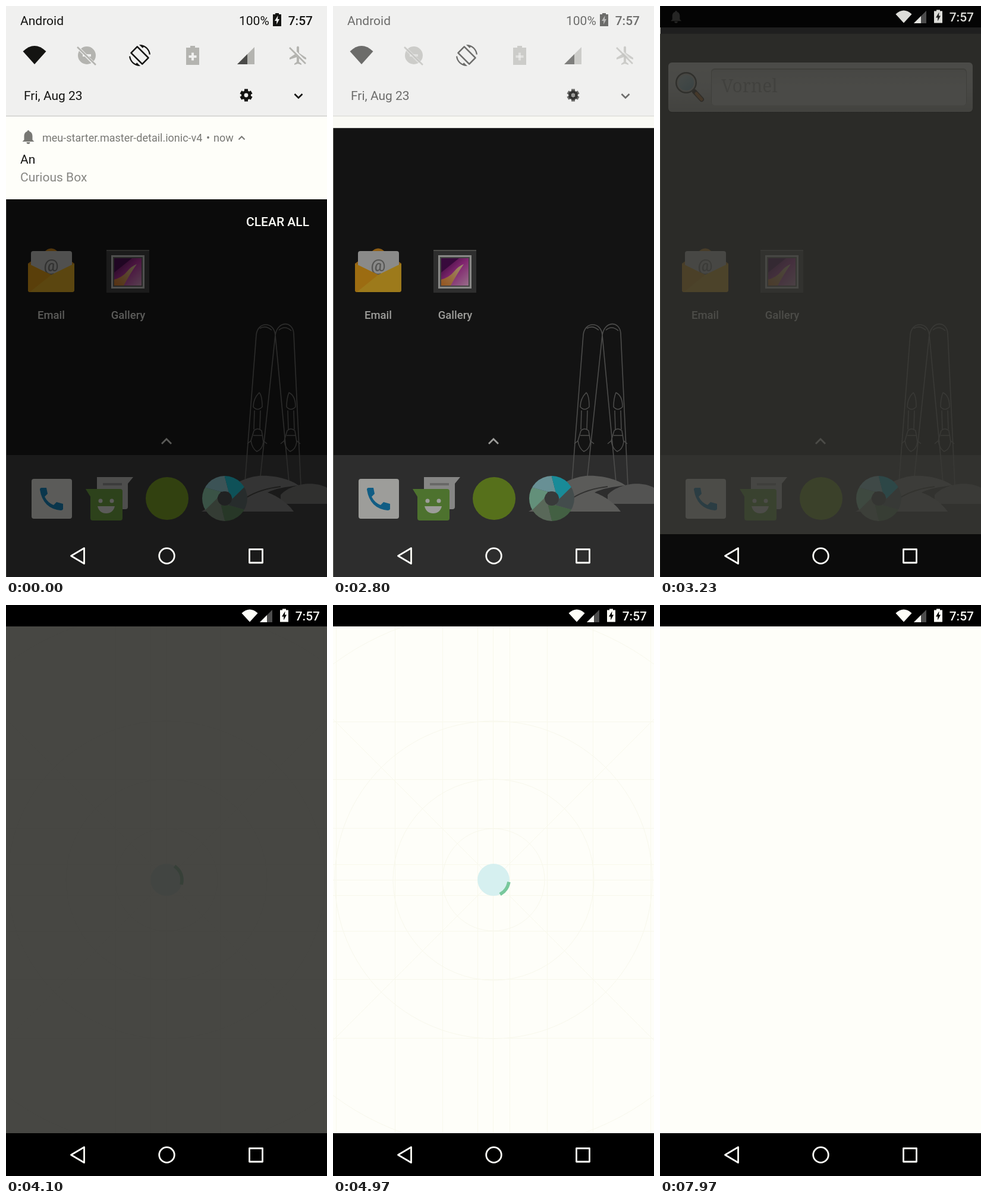
Animation, 540 px wide and 960 px high, one loop 8000 ms. Source, as an HTML page with a canvas:

```html
<!DOCTYPE html>
<html lang="en">
<head>
<meta charset="utf-8">
<title>Notification to splash</title>
<style>
html, body { margin: 0; width: 100%; height: 100%; overflow: hidden; background: #000; }
canvas { display: block; width: 540px; height: 960px; }
</style>
</head>
<body>
<canvas id="stage" width="540" height="960"></canvas>
<script>
const g = document.getElementById('stage').getContext('2d');
const LOOP = 8000;
const HEADER = '#f0f0ef', PAPER = '#fefef9', INK = '#141412', MUTED = '#b4b4b0', GREY = '#787874';
const WHITE = '#fdfdf8', WINDOW = '#2e2e2b';

const clamp = v => Math.max(0, Math.min(1, v));
const span = (t, a, b) => clamp((t - a) / (b - a));
const mix = (a, b, k) => a + (b - a) * k;
const easeOut = k => 1 - (1 - k) ** 3;
const easeInOut = k => k * k * (3 - 2 * k);

function box(x, y, w, h, col) { g.fillStyle = col; g.fillRect(x, y, w, h); }
function round(x, y, w, h, r, col) {
  g.fillStyle = col; g.beginPath(); g.roundRect(x, y, w, h, r); g.fill();
}
function disc(x, y, r, col) {
  g.fillStyle = col; g.beginPath(); g.arc(x, y, r, 0, 7); g.fill();
}
function ring(x, y, r, w, col) {
  g.strokeStyle = col; g.lineWidth = w; g.beginPath(); g.arc(x, y, r, 0, 7); g.stroke();
}
function fill(d, col) { g.fillStyle = col; g.fill(new Path2D(d)); }
function line(d, w, col) { g.strokeStyle = col; g.lineWidth = w; g.stroke(new Path2D(d)); }
function text(s, x, y, size, col, weight = 400, align = 'left', family = 'Roboto, sans-serif') {
  g.font = `${weight} ${size}px ${family}`;
  g.textAlign = align;
  g.fillStyle = col;
  g.fillText(s, x, y);
}
function at(x, y, draw) { g.save(); g.translate(x, y); draw(); g.restore(); }
function faded(a, draw) { g.save(); g.globalAlpha *= a; draw(); g.restore(); }
function gradient(x0, y0, x1, y1, ...cols) {
  const gr = g.createLinearGradient(x0, y0, x1, y1);
  cols.forEach((c, i) => gr.addColorStop(i / (cols.length - 1), c));
  return gr;
}

// Small system icons
function wifi(cx, y, w, h, col) {
  const e = y + h * .3;
  fill(`M${cx} ${y + h}L${cx - w / 2} ${e}Q${cx} ${y - h * .3} ${cx + w / 2} ${e}Z`, col);
}
function signal(x, y, s, cut, on, off) {
  fill(`M${x} ${y + s}L${x + s} ${y}V${y + s}Z`, off);
  fill(`M${x} ${y + s}L${x + cut} ${y + s - cut}V${y + s}Z`, on);
}
function battery(x, y, col, bolt) {
  at(x, y, () => {
    fill('M4 0H10V2H14V22H0V2H4Z', col);
    fill('M8.5 4L3 13H6.2V19L11 10H8Z', bolt);
  });
}
function bell(cx, cy, s, col) {
  at(cx, cy, () => {
    g.scale(s, s);
    fill('M-2-9A2 2 0 0 1 2-9C6-8 7-4 7-1V5L10 8H-10L-7 5V-1C-7-4-6-8-2-9ZM-3 9H3A3 3 0 0 1-3 9Z', col);
  });
}
function statusIcons(back) {
  wifi(410, 7.5, 27, 21, WHITE);
  signal(427, 8, 21, 12, WHITE, 'rgba(255,255,255,.3)');
  battery(461, 6.5, WHITE, back);
  text('7:57', 528, 26, 21, WHITE, 500, 'right');
}
function navButtons() {
  g.lineJoin = 'round';
  line('M109.5 924.5L131.5 911.5V937.5Z', 2.8, WHITE);
  ring(270.5, 924.5, 12.8, 2.8, WHITE);
  line('M409.5 913.5H431.5V936H409.5Z', 2.8, WHITE);
}

// Home screen
function skis() {
  const c = '#7c7c7a';
  g.lineJoin = 'round';
  line('M402 800L421 553C423 530 451 530 453 553L427 800M427 542Q437 536 447 545M453 553L476 800', 1.6, c);
  line('M453 553C457 529 482 529 484 550L496 806M459 545Q469 536 480 546', 1.6, c);
  for (const [x, lean] of [[423, -1], [479, 1]]) {
    at(x, 0, () => line(`M${-lean * 3} 650Q-7 660-7 674Q0 682 8 674Q8 655 ${-lean * 3} 650Z
      M-5 680L${-5 + lean} 712M5 680L${5 + lean} 712M-6 714Q0 708 7 714L10 733Q8 746-1 749Q-9 744-11 731Z
      M-7 722H8M-11 731L-17 736M10 731L16 736`, 1.5, c));
  }
  fill('M462 822C476 806 514 796 540 810V837H462Z', '#868684');
  fill('M329 850C350 840 372 796 425 790C455 788 482 798 492 806C472 808 450 812 440 818C458 824 476 838 484 850Z', '#929290');
  line('M405 826Q428 812 462 808', 2, '#50504e');
}
function searchBar() {
  round(14, 97, 512, 83, 6, '#0c0c0b');
  round(14, 95, 512, 83, 6, gradient(0, 95, 0, 178, '#fbfbfa', '#ececea', '#bebebb'));
  round(86, 105, 430, 62, 6, '#a4a4a1');
  round(87, 107, 428, 60, 5, gradient(0, 107, 0, 167, '#dededc', '#f3f3f2', '#f3f3f2'));
  g.lineCap = 'round';
  line('M58 144L70 157', 8, '#3a2a20');
  line('M61 147L70 157', 5, '#d0752c');
  g.lineCap = 'butt';
  disc(44, 129, 18, '#3c3c3a');
  disc(44, 129, 15.5, '#deded8');
  disc(44, 129, 13, gradient(34, 118, 54, 142, '#d8f2f6', '#84c4dc'));
  text('Vornel', 103, 145, 30, '#b4b4b2', 400, 'left', '"Noto Serif", serif');
}
function emailIcon() {
  fill('M37 433L70 409Q76 406 82 409L115 433V477Q115 481 111 481H41Q37 481 37 477Z', '#e69820');
  round(42, 412, 69, 56, 4, '#dededc');
  text('@', 76, 446, 28, '#8a8a88', 500, 'center');
  fill('M37 433L76 452L115 433V477Q115 481 111 481H41Q37 481 37 477Z', '#fdc42c');
  fill('M37 433L76 452L40 481Q37 481 37 477Z', '#fbae1c');
}
function galleryIcon() {
  box(169, 410, 72, 72, '#4a4a4a');
  box(169, 410, 72, 2, '#787874');
  box(177, 419, 56, 56, '#dcdcda');
  box(180, 422, 50, 50, '#6c6c6a');
  box(182, 424, 46, 46, gradient(182, 424, 228, 470, '#4a0c50', '#d03cb4', '#f4b0dc'));
  fill('M182 470V460Q196 456 204 446Q210 438 220 434Q210 448 198 470Z', gradient(182, 470, 220, 434, '#f08830', '#fce4b8'));
  fill('M182 424H212L182 448Z', '#5a1060');
}
function phoneIcon() {
  round(43, 795, 68, 67, 4, WHITE);
  fill('M60 810H68L70 820L65 825Q70 835 80 839L85 834L96 837V846Q95 848 92 848Q62 845 57 813Q57 810 60 810Z', '#1c96d4');
}
function messageIcon() {
  fill('M153 792H214L205 803V842Q205 846 201 846H157Q153 846 153 842Z', '#d8d8d6');
  box(163, 802, 32, 4, '#a8a8a6');
  fill('M134 812H192Q196 812 196 816V861Q196 865 192 865H146Q142 865 142 861V825Z', '#7cb84a');
  disc(159, 832, 3.5, WHITE);
  disc(178, 832, 3.5, WHITE);
  fill('M154 841H183Q180 853 168.5 853Q157 853 154 841Z', WHITE);
}
function cameraIcon() {
  const cols = ['#6c7a7a', '#6c9a6c', '#90a890', '#a0e8c4', '#a8e8f0', '#28e0f4'];
  g.save();
  g.beginPath(); g.arc(368, 828, 38, 0, 7); g.clip();
  cols.forEach((c, i) => {
    const a = i * Math.PI / 3;
    const p = (r, b) => `${368 + r * Math.cos(b)} ${828 + r * Math.sin(b)}`;
    fill(`M${p(13, a)}L${p(52, a - .6)}L${p(60, a - .08)}L${p(52, a + .45)}L${p(13, a + 1.06)}Z`, c);
  });
  disc(368, 828, 12, '#5a5e5e');
  g.restore();
}
function home() {
  box(0, 0, 540, 960, '#1f1f1f');
  box(0, 755, 540, 205, '#494949');
  box(0, 0, 1, 960, '#a8a8a0');
  skis();
  searchBar();
  emailIcon();
  galleryIcon();
  text('Email', 76, 526, 18.5, WHITE, 500, 'center');
  text('Gallery', 205.5, 526, 18.5, WHITE, 500, 'center');
  g.lineJoin = 'miter';
  line('M262 736L270 728L278 736', 2.8, WHITE);
  phoneIcon();
  messageIcon();
  disc(271, 828, 36, '#8ab42c');
  cameraIcon();
}

// Notification shade
function rotateIcon(x, y) {
  at(x, y, () => {
    g.scale(1.5, 1.5);
    g.lineJoin = 'round';
    line('M-2.8-9.7L-9.7-2.8L2.8 9.7L9.7 2.8Z', 1.7, INK);
    const arrow = 'M4.5-9.5C7.8-7.9 10.1-4.8 10.5-1H12C11.4-7.2 6.3-12 0-12L-.7-12L3.2-8.2Z';
    fill(arrow, INK);
    g.rotate(Math.PI);
    fill(arrow, INK);
  });
}
function quickTiles() {
  wifi(48, 67, 39, 31, INK);

  disc(136, 83, 15, MUTED);
  box(129, 81, 14, 4, HEADER);
  line('M121 70L150 99', 5, HEADER);
  line('M120 69L151 99', 2.6, MUTED);

  rotateIcon(225, 83);

  fill('M310 67H318V70H325V99H303V70H310Z', MUTED);
  box(307.5, 83, 13, 4, HEADER);
  box(312, 78.5, 4, 13, HEADER);

  signal(389, 69, 29, 17, '#4a4a48', MUTED);

  fill('M489 69Q491 66 493 69V79L505 87V90L493 86V94L497 97V99L491 97L485 99V97L489 94V86L477 90V87L489 79Z', MUTED);
  line('M478 69L505 96', 5, HEADER);
  line('M477 70L504 97', 2.6, MUTED);
}
function gear(x, y) {
  at(x, y, () => {
    for (let i = 0; i < 3; i++) { box(-3, -10.5, 6, 21, INK); g.rotate(Math.PI / 3); }
    ring(0, 0, 5.7, 4.6, INK);
    disc(0, 0, 3.4, HEADER);
  });
}
function header() {
  text('Android', 24, 32, 21, INK);
  text('100%', 392, 32, 21, INK);
  battery(449, 12, INK, HEADER);
  text('7:57', 516, 32, 21, INK, 500, 'right');
  quickTiles();
  text('Fri, Aug 23', 30, 158, 21, INK);
  gear(404, 150);
  g.lineJoin = 'miter';
  line('M485.5 148L492 154.5L498.5 148', 2.6, INK);
}
function notification(pressed) {
  box(0, 185, 540, 140, pressed ? '#f9f9f4' : PAPER);
  bell(37.5, 220, 1, GREY);
  text('meu-starter.master-detail.ionic-v4', 61, 228, 18, GREY);
  text('•', 340, 228, 18, GREY, 400, 'center');
  text('now', 349, 228, 18, GREY);
  g.lineJoin = 'miter';
  line('M391.5 224.5L396.5 219.5L401.5 224.5', 2, GREY);
  text('An', 24, 265, 21, INK);
  text('Curious Box', 24, 295, 21, '#868682');
}
function shade(t) {
  const k = easeInOut(span(t, 2670, 2970));
  const h = mix(325, 30, k) - 30 * span(t, 2970, 3050);
  faded(.64 * (1 - k), () => box(0, 0, 540, 960, '#000'));
  faded(1 - span(t, 2670, 2770), () => text('CLEAR ALL', 510, 370, 21, WHITE, 500, 'right'));
  if (h > 0) {
    g.save();
    g.beginPath(); g.rect(0, 0, 540, h); g.clip();
    at(0, h - 325, () => notification(t >= 2370));
    const top = Math.min(185, h);
    box(0, 0, 540, top, HEADER);
    faded(1 - k, () => {
      at(0, top - 185, header);
      box(0, top - 1, 540, 2, '#d8d8d6');
    });
    g.restore();
  }
  const open = h > 15;
  faded(span(t, 2870, 2970), () => {
    bell(27, 18, .9, open ? '#a4a4a2' : WHITE);
    statusIcons(open ? HEADER : '#1f1f1f');
  });
}

// App window and splash
function bezier(x1, x2, x) {
  let lo = 0, hi = 1;
  for (let i = 0; i < 20; i++) {
    const s = (lo + hi) / 2, r = 1 - s;
    if (3 * x1 * s * r * r + 3 * x2 * s * s * r + s ** 3 < x) lo = s; else hi = s;
  }
  return easeInOut(lo);
}
function spinner(t) {
  const e = Math.max(0, t - 3935), p = e % 1333 / 1333;
  const turn = -90 + e * 720 / 4444 + 90 * p;
  const head = turn + 270 * bezier(.4, .2, clamp(p * 2));
  const tail = turn + 270 * bezier(.4, .2, clamp(p * 2 - 1));
  const rad = Math.PI / 180;
  g.strokeStyle = '#78c89c';
  g.lineWidth = 5.6;
  g.lineCap = 'square';
  g.beginPath();
  g.arc(269, 462, 27, tail * rad, Math.max(head, tail + .5) * rad);
  g.stroke();
  g.lineCap = 'butt';
}
function guides() {
  const c = '#f8f8ec';
  for (const x of [5, 104, 184, 243, 269, 297, 360, 437, 534]) box(x, 36, 1, 852, c);
  for (const y of [196, 293, 375, 436, 462, 488, 548, 629, 728]) box(0, y, 540, 1, c);
  for (const r of [86, 169, 267, 452]) ring(270, 462, r, 1, c);
  line('M0 192L540 732M0 732L540 192', 1, c);
}
function splash(t) {
  g.save();
  g.beginPath(); g.rect(0, 36, 540, 852); g.clip();
  box(0, 36, 540, 852, PAPER);
  guides();
  disc(270, 462, 27, '#d6f0f0');
  spinner(t);
  faded(1 - span(t, 4056, 4424), () => box(0, 36, 540, 852, WINDOW));
  faded(span(t, 5735, 6230), () => box(0, 36, 540, 852, PAPER));
  g.restore();
}
function app(t) {
  box(0, 0, 540, 960, '#000');
  box(0, 36, 540, 852, WINDOW);
  if (t >= 4100) splash(t);
  statusIcons('#000');
}

function draw(t) {
  g.globalAlpha = 1;
  if (t < 3430) {
    home();
    shade(t);
    const k = easeOut(span(t, 3050, 3430));
    const rise = 75 * (1 - k);
    faded(k, () => {
      box(0, 0, 540, 36, '#000');
      box(0, 888, 540, 72, '#000');
      box(0, 36 + rise, 540, 852 - rise, WINDOW);
      statusIcons('#000');
    });
  } else app(t);
  navButtons();
}

const start = performance.now();
function tick() {
  draw((performance.now() - start) % LOOP);
  requestAnimationFrame(tick);
}
tick();
</script>
</body>
</html>
```
